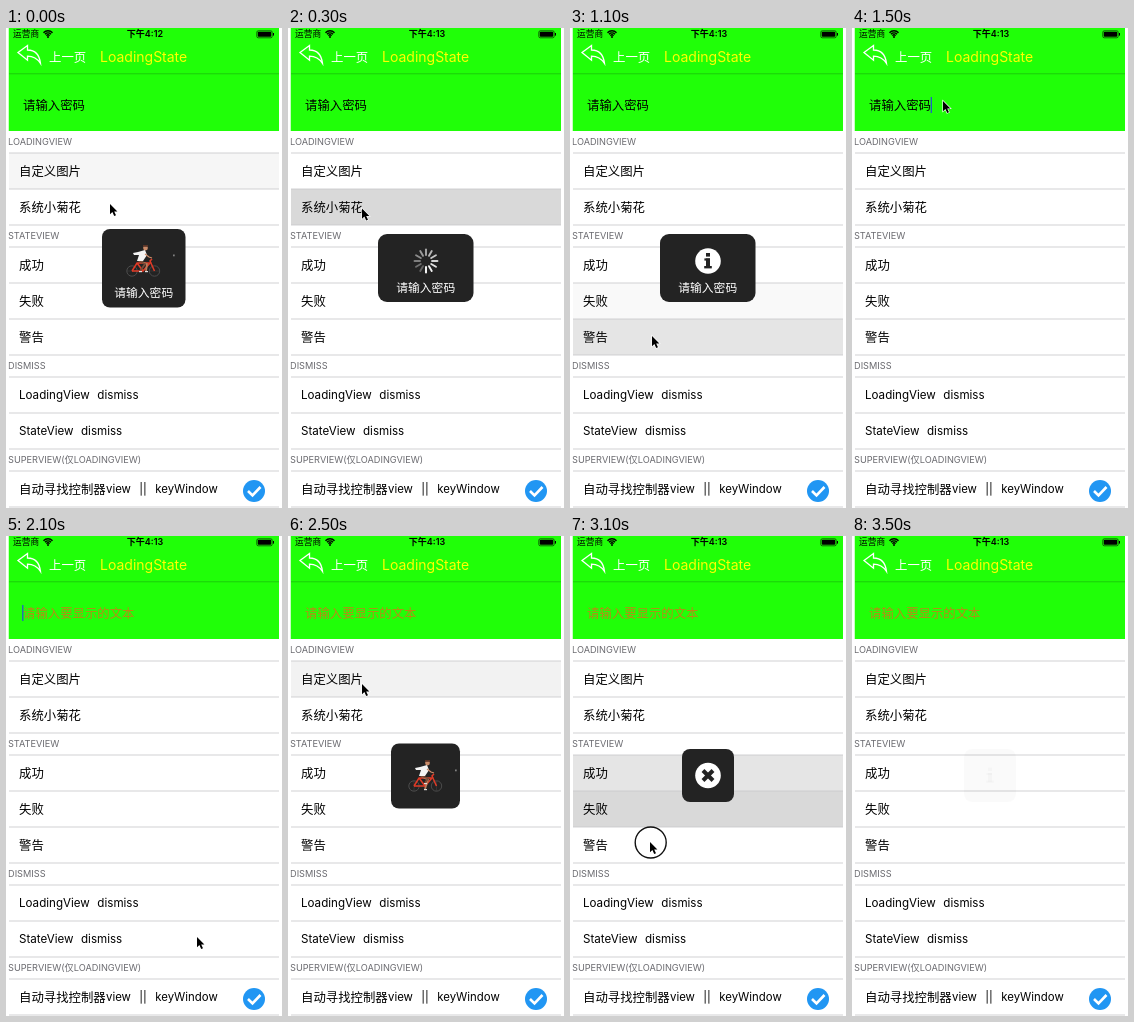
These frames come from a looping animation (276 px wide and 480 px high, 3600 ms). An HTML page with a canvas:

```html
<!DOCTYPE html>
<html lang="zh">
<head>
<meta charset="utf-8">
<style>
html, body { margin: 0; width: 276px; height: 480px; overflow: hidden; background: #fff; }
canvas { display: block; width: 276px; height: 480px; }
</style>
</head>
<body>
<canvas id="stage"></canvas>
<script>
const LOOP = 3600, STEP = 100, TAU = Math.PI * 2;
const FONT = 'Inter, "Noto Sans CJK SC", "Noto Sans CJK", sans-serif';
const GREEN = '#20ff08', DARK = '#232323';
const PASSWORD = '请输入密码';
const canvas = document.getElementById('stage');
const scale = Math.max(1, devicePixelRatio || 1);
canvas.width = 276 * scale;
canvas.height = 480 * scale;
const c = canvas.getContext('2d');

const HEADERS = [[103, 'LOADINGVIEW'], [197, 'STATEVIEW'], [327, 'DISMISS'], [421, 'SUPERVIEW(仅LOADINGVIEW)']];
const ROWS = [[125, '自定义图片'], [161, '系统小菊花'], [219, '成功'], [255, '失败'], [291, '警告'],
  [349, 'LoadingView  dismiss'], [385, 'StateView  dismiss'], [443, '自动寻找控制器', 'view  ||  keyWindow']];

// Overlay changes: time, kind, tapped row
const SHOWS = [[-230, 'bike', 0], [300, 'spin', 1], [700, 'done', 2], [850, 'fail', 3], [1000, 'info', 4],
  [2300, 'bike', 0], [2800, 'spin', 1], [3000, 'done', 2], [3100, 'fail', 3], [3200, 'info', 4]];
const POINTER = [[0, 104, 176], [200, 72, 179], [400, 76, 182], [600, 76, 241], [700, 80, 281], [800, 80, 278],
  [900, 82, 303], [1100, 82, 308], [1300, 82, 240], [1500, 91, 73], [1900, 91, 75], [2100, 191, 401],
  [2200, 76, 146], [2500, 74, 148], [2700, 86, 181], [2900, 82, 238], [3000, 80, 272], [3100, 80, 306], [3300, 84, 312]];

const clamp = v => Math.max(0, Math.min(1, v));

function text(s, x, y, size, color = '#000', weight = 400, align = 'left') {
  c.font = `${weight} ${size}px ${FONT}`;
  c.textAlign = align;
  c.fillStyle = color;
  c.fillText(s, x, y);
}

function rect(x, y, w, h, color) {
  c.fillStyle = color;
  c.fillRect(x, y, w, h);
}

function box(x, y, w, h, r, color) {
  c.fillStyle = color;
  c.beginPath();
  c.roundRect(x, y, w, h, r);
  c.fill();
}

function disc(x, y, r, color) {
  c.fillStyle = color;
  c.beginPath();
  c.arc(x, y, r, 0, TAU);
  c.fill();
}

function ring(x, y, r, color, width, from = 0, to = TAU) {
  c.strokeStyle = color;
  c.lineWidth = width;
  c.beginPath();
  c.arc(x, y, r, from, to);
  c.stroke();
}

function line(color, width, ...p) {
  c.strokeStyle = color;
  c.lineWidth = width;
  c.beginPath();
  for (let i = 0; i < p.length; i += 2) c.lineTo(p[i], p[i + 1]);
  c.stroke();
}

function statusBar(t) {
  text('运营商', 7, 9.4, 8.7);
  for (const r of [2.2, 4.3, 6.4]) ring(42, 9.2, r, '#000', 1.4, -Math.PI * .75, -Math.PI * .25);
  disc(42, 9, 1, '#000');
  text('下午4:' + (t < 300 ? 12 : 13), 139, 9.4, 9, '#000', 600, 'center');
  c.strokeStyle = '#000';
  c.lineWidth = .6;
  c.beginPath();
  c.roundRect(250.8, 2.8, 15.4, 7, 1.5);
  c.stroke();
  box(251.8, 3.8, 13.4, 5, .8, '#000');
  rect(267, 5, 1, 2.6, '#000');
}

function navBar() {
  c.strokeStyle = '#fff';
  c.lineWidth = 1.3;
  c.stroke(new Path2D('M12 24.5L21.5 17.5V22C29 22 33.5 27 34.5 35.5C31 30 27.5 28.2 21.5 28.2V32.2Z'));
  text('上一页', 43, 34, 12.4, '#fff', 300);
  text('LoadingState', 94, 34, 14, '#ffff00');
  rect(3, 45.5, 270, .7, '#17b80a');
}

function field(t) {
  const left = t < 1600 ? 5 : Math.max(0, 4 - Math.floor((t - 1600) / 100));
  if (left) text(PASSWORD.slice(0, left), 17, 81.5, 12.4);
  else text('请输入要显示的文本', 17, 81.5, 12.4, '#b98a17');
  if (t >= 1400 && t < 2300) rect(16.2 + left * 12.5, 69, 1.2, 16, '#2452d8');
}

function list(t) {
  for (const [start, , row] of SHOWS) {
    const level = clamp(1 - (t - start) / 300);
    if (t >= start && level) rect(3, ROWS[row][0], 270, 36, `rgba(0,0,0,${.15 * level})`);
  }
  for (const [y, name] of HEADERS) {
    text(name, 2, y + 14.4, 9.2, '#6b6b70');
    if (y > 103) rect(3, y - .4, 270, .8, '#c6c6c8');
  }
  for (const [y, name, tail] of ROWS) {
    const latin = name.charCodeAt(0) < 128;
    rect(3, y - .4, 270, .8, '#c6c6c8');
    c.wordSpacing = '.5px';
    text(name, 13, y + (latin ? 22.2 : 22.5), latin ? 11.6 : 12.4);
    c.wordSpacing = '1px';
    if (tail) text(tail, 100, y + 22.2, 11.4);
    c.wordSpacing = '0px';
  }
  rect(3, 478.6, 270, .8, '#c6c6c8');
  disc(248, 463, 11, '#2196f3');
  line('#fff', 2.6, 242, 463, 246.5, 467.5, 254.5, 459);
}

function bike(y, t) {
  c.save();
  c.translate(137, y);
  const turn = t / 400 * TAU;
  for (const x of [-11, 11.5]) {
    ring(x, 10, 5.2, '#4b4b4b', 1);
    line('#444', .5, x - 5 * Math.cos(turn), 10 - 5 * Math.sin(turn), x + 5 * Math.cos(turn), 10 + 5 * Math.sin(turn));
  }
  line('#e03a26', 1.5, -11, 10, -6, 2, 7, 2, 0, 10, -6, 2);
  line('#e03a26', 1.5, -11, 10, 0, 10);
  line('#e03a26', 1.5, 11.5, 10, 7, 0, 9, -2);
  for (const side of [0, Math.PI]) {
    const fx = 3 * Math.cos(turn + side), fy = 10 + 3 * Math.sin(turn + side);
    line(side ? '#7b4a36' : '#b97a5a', 1.8, -4, 0, 3 + fx / 3, 1 + fy / 5, fx, fy);
    rect(fx - 1, fy, 3, 1.2, '#ddd');
  }
  c.fillStyle = '#f4f4f4';
  c.fill(new Path2D('M-10 -8L-5 -9L2 -11L4 -6L0 0L-6 0L-4 -6L-9 -6Z'));
  line('#c98b69', 1.3, 2, -7, 6, -4, 9, -3);
  disc(2.5, -13, 2.4, '#c98b69');
  rect(0, -16, 5, 1.8, '#5a3426');
  rect(30.3, -6.5, 1.2, 1.8, '#aaa');
  c.restore();
}

function spinner(y, t) {
  for (let i = 0; i < 12; i++) {
    const a = i / 12 * TAU, age = (Math.floor(t / 83) - i + 1200) % 12;
    const x = Math.cos(a), z = Math.sin(a);
    c.lineCap = 'round';
    line(`rgba(255,255,255,${1 - age * .065})`, 1.9, 138 + x * 6, y + z * 6, 138 + x * 11.5, y + z * 11.5);
  }
  c.lineCap = 'butt';
}

function badge(kind, y) {
  const x = 138;
  disc(x, y, 12.8, '#fff');
  if (kind == 'done') line(DARK, 4, x - 7, y, x - 2, y + 5, x + 7, y - 4);
  else if (kind == 'fail') {
    line(DARK, 4, x - 5, y - 5, x + 5, y + 5);
    line(DARK, 4, x + 5, y - 5, x - 5, y + 5);
  } else {
    rect(x - 2, y - 8, 4, 3.6, DARK);
    rect(x - 3.6, y - 2.6, 5.6, 2.2, DARK);
    rect(x - 2, y - 2.6, 4, 9, DARK);
    rect(x - 3.8, y + 5, 7.6, 2.4, DARK);
  }
}

function overlay(t) {
  const [, kind] = SHOWS.filter(s => s[0] <= t).pop();
  const first = t < 1900;
  const fade = first ? clamp((1400 - t) / 200) : t < 2300 ? 0 : t < 3400 ? 1 : t < 3500 ? .45 : .02;
  if (!fade) return;
  c.globalAlpha = fade;
  if (kind == 'bike') {
    if (first) box(96, 201, 83.5, 78.5, 8, DARK);
    else box(103, 207.5, 69, 65, 8, DARK);
    bike(first ? 233 : 240, t);
  } else {
    if (first) box(90, 206, 95.5, 68, 9, DARK);
    else box(112, 213, 52, 53, 8, DARK);
    const y = first ? 233 : 239.5;
    if (kind == 'spin') spinner(y, t);
    else badge(kind, y);
  }
  if (first) text(PASSWORD, 137.7, kind == 'bike' ? 269.4 : 263.6, 11.8, '#fff', 400, 'center');
  c.globalAlpha = 1;
}

function pointer(t) {
  if (t >= 3400) return;
  const i = POINTER.findLastIndex(p => p[0] <= t);
  const a = POINTER[i], b = POINTER[i + 1] || a;
  const k = b == a ? 0 : (t - a[0]) / (b[0] - a[0]), e = k * k * (3 - 2 * k);
  const x = a[1] + (b[1] - a[1]) * e, y = a[2] + (b[2] - a[2]) * e;
  if (SHOWS.some(s => t >= s[0] - 100 && t < s[0])) ring(x + .7, y + .5, 15.5, '#111', 1.4);
  c.save();
  c.translate(x, y);
  const arrow = new Path2D('M0 0V10.2L2.4 8L4.2 12L6 11.2L4.2 7.4H7.4Z');
  c.strokeStyle = '#fff';
  c.lineWidth = 1.2;
  c.stroke(arrow);
  c.fillStyle = '#000';
  c.fill(arrow);
  c.restore();
}

function draw(t) {
  c.setTransform(scale, 0, 0, scale, 0, 0);
  rect(0, 0, 276, 480, '#fff');
  c.save();
  c.beginPath();
  c.rect(2.5, 0, 270.5, 480);
  c.clip();
  rect(2.5, 0, 270.5, 103, GREEN);
  statusBar(t);
  navBar();
  field(t);
  list(t);
  overlay(t);
  pointer(t);
  c.restore();
}

const begin = performance.now();
function tick() {
  const t = (performance.now() - begin) % LOOP;
  draw(Math.floor(t / STEP) * STEP);
  requestAnimationFrame(tick);
}
tick();
</script>
</body>
</html>
```
